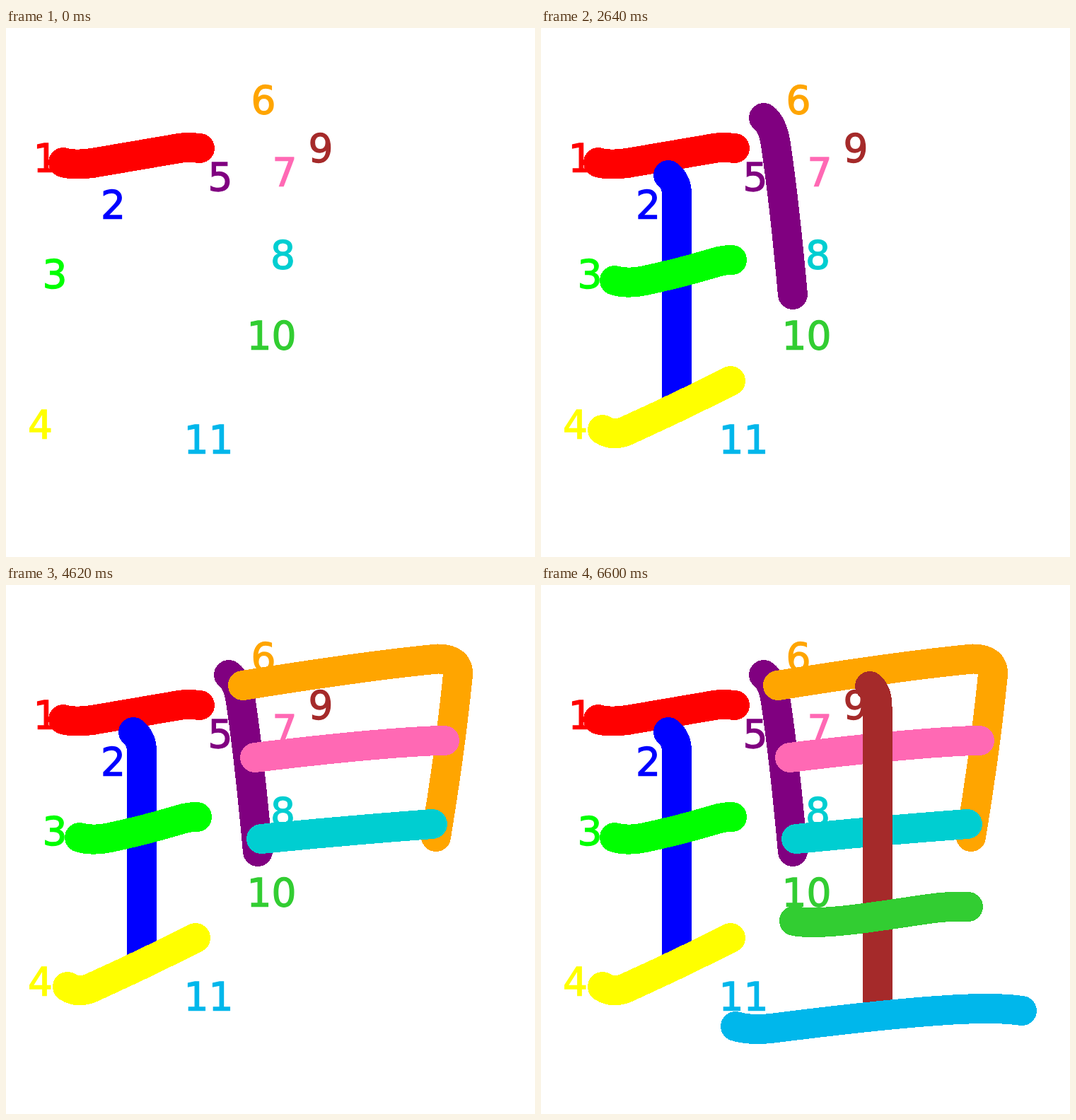
An HTML page that plays this animation: 748 by 748 pixels, repeating every 7260 ms.

```html
<!DOCTYPE html>
<html>
<head>
<meta charset="utf-8">
<title>Stroke order</title>
<style>
html, body { margin: 0; width: 100%; height: 100%; overflow: hidden; background: #fff; }
svg { display: block; width: 748px; height: 748px; }
text { font: 55px "DejaVu Sans", Verdana, sans-serif; stroke-width: 1.3px; }
path { fill: none; stroke-width: 42; stroke-linecap: round; stroke-linejoin: round; shape-rendering: crispEdges; }
</style>
</head>
<body>
<svg id="stage" viewBox="0 0 748 748"></svg>
<script>
const STEP = 660;

// colour, label x, label baseline, stroke path
const strokes = [
  ['#ff0000', 38.5, 202.5, 'M81 190Q95 194.500 122 191L245 170Q257 168 274 170'],
  ['#0000ff', 134, 268.5, 'M180 208Q192 218 192 235V529'],
  ['#00ff00', 51.5, 366.5, 'M104 357Q122 362 145 357.500Q195 347 245 332Q256 328 270 328'],
  ['#ffff00', 31, 580, 'M87 568Q102 578 122 569Q195 536 268 499'],
  ['#800080', 285.5, 230, 'M315 127Q328 137 332 165Q344 245 356 377'],
  ['#ffa500', 346.5, 121, 'M335 142Q510 114 610 104.500Q640 104 639 127Q628 235 608 356'],
  ['#ff69b4', 376.5, 222.5, 'M352 244Q500 226 590 221Q608 220 620 220'],
  ['#00ced1', 374, 340, 'M361 359Q481 347 603 338'],
  ['#a52a2a', 427.5, 188.5, 'M465 143Q475.500 152 475.500 172V602'],
  ['#32cd32', 340.5, 454, 'M358 475Q385 481 465 470C540 460 565 453 604 455'],
  ['#00b7eb', 251.5, 600.5, 'M275 624Q295 630 325 627Q475 608 560 602Q640 596 680 602']
];

const stage = document.getElementById('stage');

function add(tag, attrs) {
  const el = document.createElementNS('http://www.w3.org/2000/svg', tag);
  for (const name in attrs) el.setAttribute(name, attrs[name]);
  return stage.appendChild(el);
}

strokes.forEach(([color, x, y], i) => {
  add('text', { fill: color, stroke: color, x, y }).textContent = i + 1;
});
const paths = strokes.map(([stroke, , , d]) => add('path', { stroke, d }));

const start = performance.now();

function draw() {
  const elapsed = performance.now() - start;
  const current = Math.floor(elapsed / STEP) % paths.length;
  paths.forEach((path, i) => {
    path.style.visibility = i <= current ? 'visible' : 'hidden';
  });
  requestAnimationFrame(draw);
}
draw();
</script>
</body>
</html>
```
